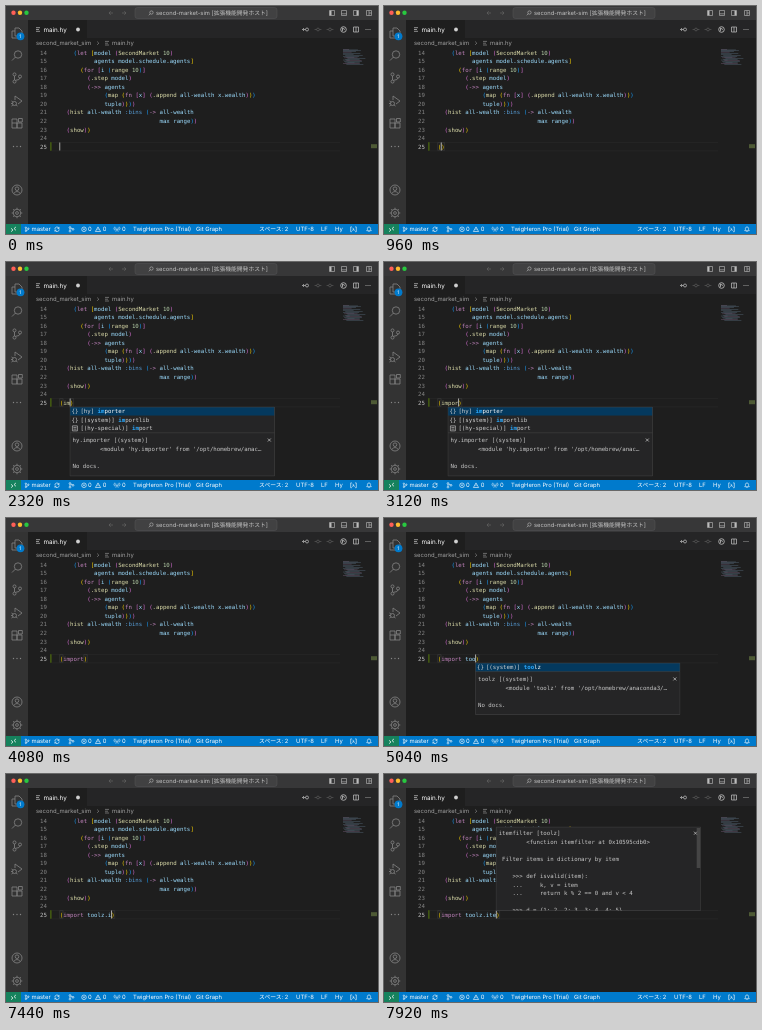
Recreate the animation shown at these times as an HTML page with a canvas. Size 372x228 px, loop 8000 ms.

```html
<!DOCTYPE html>
<html lang="ja">
<head>
<meta charset="utf-8">
<title>Editor completion</title>
<style>
html, body { margin: 0; width: 100%; height: 100%; overflow: hidden; background: #1e1e1e; }
canvas { display: block; width: 372px; height: 228px; }
</style>
</head>
<body>
<canvas id="stage"></canvas>
<script>
const W = 372, H = 228, LOOP = 8000;
const canvas = document.getElementById('stage');
const ratio = window.devicePixelRatio || 1;
canvas.width = W * ratio;
canvas.height = H * ratio;
const c = canvas.getContext('2d');
c.scale(ratio, ratio);
c.textRendering = 'geometricPrecision';

const CW = 3.44, LH = 8.545, CODE_X = 53.7, TOP_Y = 46.5, LINE_Y = TOP_Y + 11 * LH;
const UI = '"Inter", "Noto Sans CJK JP", "Noto Sans CJK", sans-serif';
const MONO = '5.715px "DejaVu Sans Mono", monospace';
const BRACKETS = ['#ffd700', '#da70d6', '#179fff'];
const KEYWORDS = ['let', 'for', 'fn', 'import', '->', '->>'];

const CODE = [
  '    (let [model (SecondMarket 10)',
  '          agents model.schedule.agents]',
  '      (for [i (range 10)]',
  '        (.step model)',
  '        (->> agents',
  '             (map (fn [x] (.append all-wealth x.wealth)))',
  '             tuple))))',
  '  (hist all-wealth :bins (-> all-wealth',
  '                             max range))',
  '  (show))',
  ''
];

// time, text left of the cursor, popup
const STEPS = [
  [0, ''], [960, '('], [1360, '(i'], [1440, '(i', 'snippet'],
  [1920, '(im'], [2000, '(im', 'module'], [2560, '(imp', 'module'],
  [2800, '(impo', 'module'], [2960, '(impor', 'module'], [3200, '(import', 'module'],
  [3440, '(import'], [4240, '(import '], [4480, '(import t'], [4640, '(import to'],
  [4800, '(import too'], [4960, '(import too', 'toolz'], [5680, '(import toolz'],
  [6640, '(import toolz.'], [7360, '(import toolz.i'], [7600, '(import toolz.it'],
  [7760, '(import toolz.ite'], [7840, '(import toolz.ite', 'filter']
];

const POPUPS = {
  snippet: {
    col: 2, top: 32, bottom: 136, pad: 3.7, scroll: [32, 49],
    rows: [['box', '', 'i', 'f*'], ['mod', '[hy] ', 'i', 'mporter'], ['mod', '[toolz] ', 'i', 'tertoolz'],
      ['mod', '[hyrule] ', 'i', 'terables'], ['cls', '[typing] ', 'i', 'o'], ['mod', '[(system)] ', 'i', 'mportlib']],
    doc: ['Code snippet for an if statement (vscode-hy (hylang off', 'icial))', '',
      '(if (predicate)', '    consequent', '    alternative)']
  },
  module: {
    col: 3, top: 145, bottom: 214, pad: 7.4,
    rows: [['mod', '[hy] ', 'im', 'porter'], ['mod', '[(system)] ', 'im', 'portlib'], ['key', '[(hy-special)] ', 'im', 'port']],
    doc: ['hy.importer [(system)]', "        <module 'hy.importer' from '/opt/homebrew/anac…", '', 'No docs.']
  },
  toolz: {
    col: 11, top: 145, bottom: 196.5, pad: 7.4,
    rows: [['mod', '[(system)] ', 'too', 'lz']],
    doc: ['toolz [(system)]', "        <module 'toolz' from '/opt/homebrew/anaconda3/…", '', 'No docs.']
  },
  filter: {
    col: 17, top: 53, bottom: 136.5, pad: 6.2, scroll: [54, 40],
    rows: [],
    doc: ['itemfilter [toolz]', '        <function itemfilter at 0x10595cdb0>', '',
      ' Filter items in dictionary by item', '', '    >>> def isvalid(item):',
      '    ...     k, v = item', '    ...     return k % 2 == 0 and v < 4', '',
      '    >>> d = {1: 2, 2: 3, 3: 4, 4: 5}']
  }
};

function rect(x, y, w, h, color) {
  c.fillStyle = color;
  c.fillRect(x, y, w, h);
}
function dot(x, y, r, color) {
  c.fillStyle = color;
  c.beginPath();
  c.arc(x, y, r, 0, 7);
  c.fill();
}
function text(s, x, y, color, font) {
  c.font = font;
  c.fillStyle = color;
  c.textBaseline = 'alphabetic';
  c.fillText(s, x, y);
}
const ui = (s, x, y, color, size = 5.9) => text(s, x, y + size * 0.36, color, `${size}px ${UI}`);
const mono = (s, x, y, color, weight = '') => text(s, x, y + 2.1, color, `${weight} ${MONO}`);

// Strokes an SVG path given around the point x, y.
function icon(d, x, y, color, width = 0.8, scale = 1) {
  c.save();
  c.translate(x, y);
  c.scale(scale, scale);
  c.strokeStyle = color;
  c.lineWidth = width / scale;
  c.stroke(new Path2D(d));
  c.restore();
}
const ring = (x, y, r) => `M${x + r} ${y}A${r} ${r} 0 1 1 ${x - r} ${y}A${r} ${r} 0 1 1 ${x + r} ${y}`;
const box = (x, y, w, h) => `M${x} ${y}h${w}v${h}h${-w}z`;

const ICON = {
  files: 'M-2-5H2L5-2V3H-2zM-2-2H-5V5H2V3',
  search: ring(1, -1, 3.7) + 'M-1.6 1.6L-5 5',
  branch: ring(-2.5, -3.6, 1.5) + ring(-2.5, 3.6, 1.5) + ring(3, -1.5, 1.5) + 'M-2.5-2V2M3 0Q3 2-1.5 2.3',
  debug: 'M-2-1V-5L5 0L1 3' + ring(-2.5, 2.5, 2) + 'M-5.5 0L-4 1M-6 2.5H-4.5M-5.5 5L-4 4M.5 5L-1 4',
  blocks: 'M-5-1H0V4H-5zM0-1V4H5V-1H0M-5-1V-5H0V-1' + box(1.5, -5.5, 3.8, 3.5),
  account: ring(0, 0, 5) + ring(0, -1.3, 1.8) + 'M-3.3 3.5Q0-.5 3.3 3.5',
  gear: ring(0, 0, 3.8) + ring(0, 0, 1.4) + 'M0-3.8V-5.3M0 3.8V5.3M-3.8 0H-5.3M3.8 0H5.3M-2.7-2.7L-3.8-3.8M2.7 2.7L3.8 3.8M2.7-2.7L3.8-3.8M-2.7 2.7L-3.8 3.8',
  sync: 'M-2.2 0A2.2 2.2 0 0 1 2-1M2.2 0A2.2 2.2 0 0 1-2 1M2-2.4V-.8H.5M-2 2.4V.8H-.5',
  left: 'M2 0H-2M-.3-1.8L-2 0L-.3 1.8',
  right: 'M-2 0H2M.3-1.8L2 0L.3 1.8',
  cross: 'M-1.5-1.5L1.5 1.5M1.5-1.5L-1.5 1.5',
  chevron: 'M-.8-1.6L.8 0L-.8 1.6',
  frame: box(-2.5, -2.5, 5, 5),
  lines: 'M-2-1.8H2M-2 0H1M-2 1.8H2'
};

function drawTitleBar() {
  rect(0, 0, W, 14, '#373738');
  ['#ff5f57', '#febc2e', '#28c840'].forEach((color, i) => dot(7.5 + 6.5 * i, 6.8, 2.2, color));
  icon(ICON.left, 105, 7, '#6b6b6b', 0.6);
  icon(ICON.right, 118, 7, '#6b6b6b', 0.6);
  c.beginPath();
  c.roundRect(129, 1.5, 142, 11, 2.5);
  c.fillStyle = '#414142';
  c.fill();
  c.strokeStyle = '#555556';
  c.lineWidth = 0.5;
  c.stroke();
  icon(ICON.search, 145, 7, '#bbb', 0.6, 0.45);
  ui('second-market-sim [拡張機能開発ホスト]', 150, 7, '#c4c4c4', 5.8);
  [326, 338, 350, 363].forEach((x, i) => {
    icon(ICON.frame, x, 7, '#bcbcbc', 0.6);
    if (i === 0) rect(x - 2.3, 4.7, 1.8, 4.6, '#bcbcbc');
    if (i === 1) icon('M-2.5 .8H2.5', x, 7, '#bcbcbc', 0.6);
    if (i === 2) rect(x + 0.5, 4.7, 1.8, 4.6, '#bcbcbc');
    if (i === 3) icon('M0-2.5V2.5M0 0H2.5', x, 7, '#bcbcbc', 0.6);
  });
}

function drawActivityBar() {
  rect(0, 14, 22, 204, '#333333');
  const items = [['files', 27], ['search', 49.5], ['branch', 72], ['debug', 95], ['blocks', 118], ['account', 184], ['gear', 207]];
  for (const [name, y] of items) icon(ICON[name], 11, y, '#858585', 0.8);
  for (const x of [7.5, 11, 14.5]) dot(x, 140.5, 0.7, '#858585');
  dot(14.5, 30.3, 3.9, '#007acc');
  ui('1', 13.2, 30.3, '#fff', 4.8);
}

function drawTabs() {
  rect(22, 14, 350, 18, '#252526');
  rect(22, 14, 59, 18, '#1e1e1e');
  icon(ICON.lines, 32, 23.5, '#c5c5c5', 0.7);
  ui('main.hy', 37.5, 23.5, '#fff', 6.3);
  dot(72, 23.5, 1.9, '#d0d0d0');
  icon(ring(1, 0, 1.5) + 'M-.5 0H-3.5M-2-1.4L-3.5 0L-2 1.4', 300, 23.5, '#c5c5c5', 0.7);
  icon(ring(0, 0, 1.4) + 'M-3.4 0H-1.4M1.4 0H3.4', 312, 23.5, '#5b5b5b', 0.7);
  icon(ring(0, 0, 1.4) + 'M-3.4 0H-1.4M1.4 0H3.4', 324, 23.5, '#5b5b5b', 0.7);
  icon(ring(0, 0, 2.8) + 'M-1 1.4V-1.4L1.4 0', 337.5, 23.5, '#c5c5c5', 0.8);
  icon(ICON.frame + 'M0-2.5V2.5', 350, 23.5, '#c5c5c5', 0.7);
  for (const x of [360, 362, 364]) dot(x, 23.5, 0.5, '#c5c5c5');
  ui('second_market_sim', 30, 37, '#a0a0a0');
  icon(ICON.chevron, 92, 37.2, '#a0a0a0', 0.6);
  icon(ICON.lines, 101, 37.2, '#a0a0a0', 0.6);
  ui('main.hy', 106, 37, '#a0a0a0');
}

function tokenColor(token, afterOpen) {
  if (KEYWORDS.includes(token)) return '#c586c0';
  if (/^\d+$/.test(token)) return '#b5cea8';
  if (token[0] === ':') return '#569cd6';
  return afterOpen === '(' ? '#dcdcaa' : '#9cdcfe';
}

function drawCode(line, y, depth) {
  let previous = '';
  for (const { 0: token, index } of line.matchAll(/[()[\]]|[^\s()[\]]+/g)) {
    let color;
    if (/[([]/.test(token)) color = BRACKETS[depth++ % 3];
    else if (/[)\]]/.test(token)) color = BRACKETS[--depth % 3];
    else color = tokenColor(token, previous);
    mono(token, CODE_X + index * CW, y, color);
    previous = token;
  }
  return depth;
}

function drawMinimap() {
  for (let i = 0; i < 23; i++) {
    if (i === 5 || i === 8 || i === 22) continue;
    const indent = i < 9 ? 0 : (i * 3 % 5) * 1.1;
    const length = 6 + Math.abs(Math.sin(i * 2.3)) * 12;
    rect(337 + indent, 43 + i * 0.72, length, 0.45, i % 4 ? '#526473' : '#6b5770');
  }
  rect(365, 138.2, 6, 4, '#4e5a35');
}

function drawEditor(typed, cursorOn) {
  rect(22, 32, 350, 186, '#1e1e1e');
  rect(46, LINE_Y - 4.5, 288, 0.6, '#292929');
  rect(46, LINE_Y + 4.1, 288, 0.6, '#292929');
  let depth = 2;
  for (let i = 0; i < 12; i++) {
    const y = TOP_Y + i * LH;
    mono(String(14 + i), 34.1, y, i === 11 ? '#c6c6c6' : '#858585');
    if (i < 11) depth = drawCode(CODE[i], y, depth);
  }
  rect(44.4, LINE_Y - 4.3, 1, LH, '#587c0c');
  const cursorX = CODE_X + typed.length * CW;
  if (typed) {
    for (const x of [CODE_X, cursorX]) icon(box(0, -3.8, CW, 7.6), x, LINE_Y, '#66666699', 0.4);
    drawCode(typed + ')', LINE_Y, 0);
  }
  if (cursorOn) rect(cursorX - 0.3, LINE_Y - 4, 0.8, 8, '#c4c4c0');
  drawMinimap();
}

function drawKind(kind, x, y) {
  if (kind === 'mod') mono('{}', x - 3.4, y, '#d0d0d0');
  if (kind === 'box') icon(ICON.frame, x, y, '#d0d0d0', 0.7);
  if (kind === 'key') icon(ICON.frame + 'M-1.5-.8H1.5M-1.5 .8H1.5', x, y, '#d0d0d0', 0.6);
  if (kind === 'cls') icon('M-2.5-.5L-.8-2.2L.7-.7L-1 1zM0 0H2.3M.8 0V2H2.3', x, y, '#ee9d28', 0.8);
}

function drawPopup(p) {
  const x = CODE_X + p.col * CW - 0.1, width = 204.6, height = p.bottom - p.top;
  c.save();
  c.beginPath();
  c.rect(x - 0.5, p.top - 0.5, width + 1, height + 1);
  c.clip();
  rect(x, p.top, width, height, '#252526');
  p.rows.forEach(([kind, origin, match, rest], i) => {
    const y = p.top + (i + 0.5) * LH;
    if (i === 0) rect(x, p.top, width, LH, '#04395e');
    drawKind(kind, x + 5, y);
    const start = x + 10.5, matchX = start + origin.length * CW;
    mono(origin, start, y, '#d4d4d4');
    mono(match, matchX, y, '#2aaaff', 'bold');
    mono(rest, matchX + match.length * CW, y, i === 0 ? '#fff' : '#d4d4d4');
    if (kind === 'box') mono('if', x + 193.5, y, '#b8c4cc');
  });
  const docTop = p.top + p.rows.length * LH;
  if (p.rows.length) rect(x, docTop, width, 0.5, '#454545');
  p.doc.forEach((line, i) => {
    const indent = line.search(/\S|$/);
    mono(line.trimStart(), x + 2.6 + indent * CW, docTop + p.pad + i * LH, '#c8c8c8');
  });
  icon(ICON.cross, x + width - 5.2, docTop + p.pad, '#d0d0d0', 0.7);
  if (p.scroll) rect(x + width - 4, p.scroll[0], 3.6, p.scroll[1], '#5a5a5a99');
  icon(box(0, 0, width, height), x, p.top, '#454545', 0.6);
  c.restore();
}

function drawStatusBar() {
  const y = 223.3, white = '#fff';
  rect(0, 218, W, 10, '#007acc');
  rect(0, 218, 15, 10, '#16825d');
  icon('M-2.5-1L-.5 .7L-2.5 2.4M2.5-2.4L.5-.7L2.5 1', 7.5, y, white, 0.7);
  icon(ICON.branch, 21, y, white, 0.6, 0.45);
  ui('master', 25.5, y, white);
  icon(ICON.sync, 51, y, white, 0.6);
  icon(ring(-1, -1.8, 0.9) + ring(-1, 1.8, 0.9) + ring(2, 0, 0.9) + 'M-1-.9V.9M-.3-1.3L1.3-.4', 65, y, white, 0.6);
  icon(ring(0, 0, 2.3) + 'M-.9-.9L.9 .9M.9-.9L-.9 .9', 78, y, white, 0.6);
  ui('0', 82, y, white);
  icon('M0-2.4L2.6 2.2H-2.6z M0-.8V.8', 92, y, white, 0.6);
  ui('0', 96.8, y, white);
  icon('M-1.2 2.4L0-.8L1.2 2.4M-1.2-2Q-2.2-.8-1.2 .4M1.2-2Q2.2-.8 1.2 .4M-2.3-2.6Q-3.8-.8-2.3 1M2.3-2.6Q3.8-.8 2.3 1', 111, y, white, 0.5);
  ui('0', 116, y, white);
  ui('TwigHeron Pro (Trial)', 127, y, white, 5.8);
  ui('Git Graph', 190, y, white, 5.8);
  ui('スペース: 2', 253, y, white, 5.8);
  ui('UTF-8', 290, y, white);
  ui('LF', 315, y, white);
  ui('Hy', 329, y, white);
  icon('M-1.6-2.4H-2.8V2.4H-1.6M1.6-2.4H2.8V2.4H1.6M-1 1.5L.1-.4M-.7-1.5L1 1.5', 347.5, y, white, 0.6);
  icon('M-2.3 1.4H2.3L1.6 .4V-.8Q1.5-2.3 0-2.4Q-1.5-2.3-1.6-.8V.4zM-.6 2.2H.6', 363, y, white, 0.6);
}

function draw(t) {
  const [, typed, popup] = STEPS.findLast(step => step[0] <= t);
  const edited = STEPS.find(step => step[1] === typed)[0];
  drawEditor(typed, (t - edited) % 1000 < 500);
  drawTabs();
  drawTitleBar();
  drawActivityBar();
  drawStatusBar();
  if (popup) drawPopup(POPUPS[popup]);
}

const start = performance.now();
function tick() {
  draw((performance.now() - start) % LOOP);
  requestAnimationFrame(tick);
}
tick();
</script>
</body>
</html>
```
